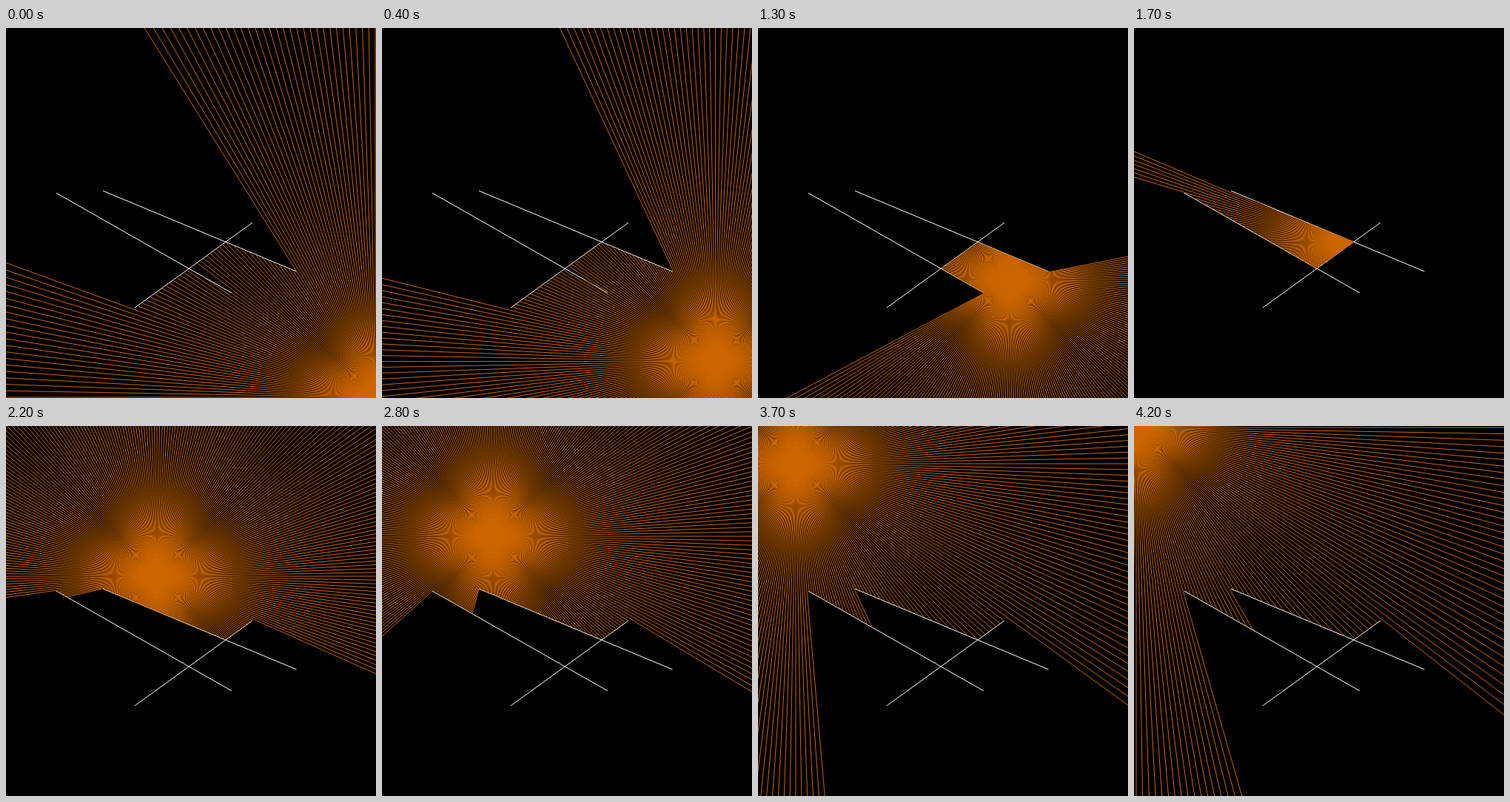
An HTML page with a canvas that plays this animation: 500x500 px, repeating every 4300 ms.

```html
<!DOCTYPE html>
<html lang="en">
<head>
<meta charset="utf-8">
<title>Ray casting</title>
<style>
html, body { margin: 0; width: 100%; height: 100%; overflow: hidden; background: #000; }
canvas { display: block; width: 500px; height: 500px; }
</style>
</head>
<body>
<canvas id="stage" width="500" height="500"></canvas>
<script>
const SIZE = 500, STEP = 100, LOOP = 4300, REACH = 800;
const ctx = document.getElementById('stage').getContext('2d');

const walls = [
  [131, 220, 392.6, 329],
  [68, 223, 305, 358],
  [174, 378, 333, 263]
];

// Path of the light: step, x, y
const path = [
  [0, 499, 499], [9, 390, 390], [17, 290, 290], [22, 204, 203],
  [24, 193, 192], [28, 150, 149], [37, 51, 51], [42, 3, 2]
];

function lightAt(step) {
  let i = 1;
  while (i < path.length - 1 && path[i][0] < step) i++;
  const [s0, x0, y0] = path[i - 1], [s1, x1, y1] = path[i];
  const k = (step - s0) / (s1 - s0);
  return [x0 + (x1 - x0) * k, y0 + (y1 - y0) * k];
}

// Each line is stroked alone, so that soft edges add up where rays crowd
function line(x0, y0, x1, y1, color) {
  ctx.strokeStyle = color;
  ctx.beginPath();
  ctx.moveTo(x0, y0);
  ctx.lineTo(x1, y1);
  ctx.stroke();
}

// Distance along the ray to a wall, or Infinity
function hit(px, py, dx, dy, [ax, ay, bx, by]) {
  const ex = bx - ax, ey = by - ay;
  const det = dx * ey - dy * ex;
  if (Math.abs(det) < 1e-9) return Infinity;
  const t = ((ax - px) * ey - (ay - py) * ex) / det;
  const u = ((ax - px) * dy - (ay - py) * dx) / det;
  return t > 0 && u >= 0 && u <= 1 ? t : Infinity;
}

function draw(step) {
  const [px, py] = lightAt(step);
  ctx.fillStyle = '#000';
  ctx.fillRect(0, 0, SIZE, SIZE);
  for (const w of walls) line(...w, '#fff');
  for (let deg = 0; deg < 360; deg++) {
    const a = deg * Math.PI / 180, dx = Math.cos(a), dy = Math.sin(a);
    const d = Math.min(REACH, ...walls.map(w => hit(px, py, dx, dy, w)));
    line(px, py, px + dx * d, py + dy * d, '#cc6600');
  }
}

const start = performance.now();
let shown = -1;

function tick() {
  const step = Math.floor((performance.now() - start) % LOOP / STEP);
  if (step !== shown) draw(shown = step);
  requestAnimationFrame(tick);
}
tick();
</script>
</body>
</html>
```
